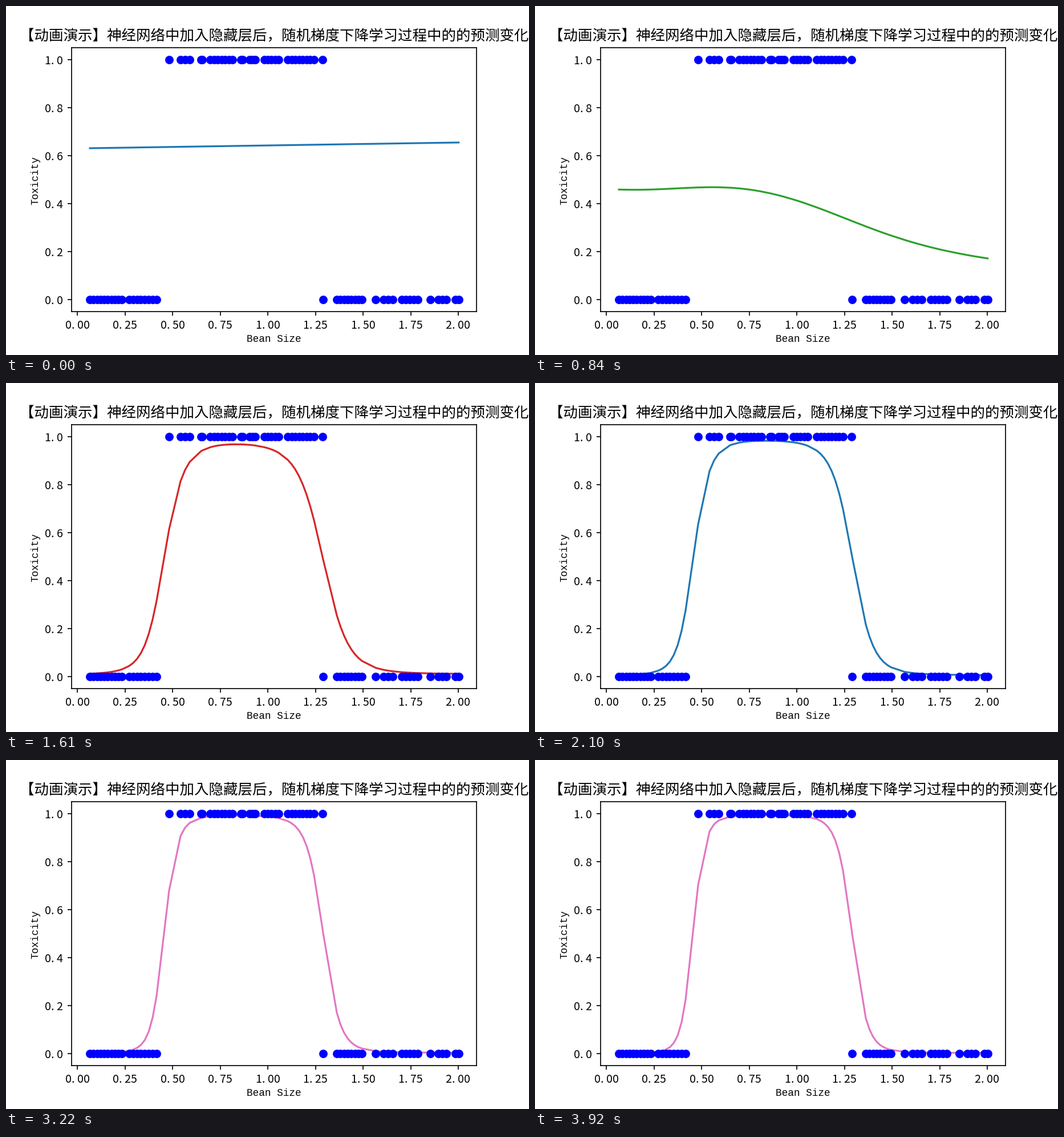
Write a matplotlib script that moves like this. It is 917 by 611 pixels and loops after 3.99 s.

```python
import numpy as np
import matplotlib.pyplot as plt
from matplotlib.animation import FuncAnimation
from matplotlib.ticker import FuncFormatter, MultipleLocator

W, H = 917, 611
DPI = 152.75
FRAMES, INTERVAL = 57, 70
SPACING = 0.0195  # usual distance between neighbouring beans

plt.rcParams["font.family"] = "Noto Sans CJK JP"

# Beans lie evenly within clusters, each given by its smallest and largest size
CLUSTERS = [(0.065, 0.233), (0.271, 0.415), (0.481, 0.481), (0.541, 0.589),
            (0.649, 0.655), (0.697, 0.814), (0.859, 0.868), (0.904, 0.934),
            (0.981, 1.056), (1.104, 1.242), (1.287, 1.290), (1.362, 1.494),
            (1.566, 1.566), (1.608, 1.656), (1.703, 1.787), (1.853, 1.853),
            (1.895, 1.937), (1.985, 2.002)]


def beans(first, last):
    if first == last:
        return [first]
    return np.linspace(first, last, max(2, round((last - first) / SPACING) + 1))


xs = np.concatenate([beans(*c) for c in CLUSTERS])
ys = ((xs > 0.45) & (xs < 1.289)).astype(int)

# Network states: bias, then weight, steepness and centre of both hidden units
BUMP = np.array([-3.51, 6.5, 7.7, 0.431, -6.45, 5.5, 1.305])
STEEP = np.array([-5.52, 10.2, 9.2, 0.438, -9.9, 7.3, 1.305])
FINAL = np.array([-6.8, 12.6, 10.3, 0.438, -11.9, 8.4, 1.296])
BEND, BUMP_AT, STEEP_AT = 10, 16, 30


def sigmoid(z):
    return 1 / (1 + np.exp(-z))


def network(bias, w1, k1, m1, w2, k2, m2):
    return bias + w1 * sigmoid(k1 * (xs - m1)) + w2 * sigmoid(k2 * (xs - m2))


def line(middle, tilt):
    return np.linspace(middle + tilt, middle - tilt, 2) @ [
        (xs[-1] - xs) / (xs[-1] - xs[0]), (xs - xs[0]) / (xs[-1] - xs[0])]


def log_mix(i, start, end, shift, a, b):
    """Blend two states with progress that slows down logarithmically."""
    u = np.log((i + shift) / (start + shift)) / np.log((end + shift) / (start + shift))
    return a + (b - a) * u


def grow(t):
    return 2 * t**2 - t**3


def tilted(i):
    """Early, nearly straight prediction whose tilt grows exponentially."""
    return line(-0.437, 0.055 * 1.31 ** (i - 1))


def prediction(i):
    if i == 0:
        z = line(0.589, -0.052)
    elif i <= BEND:
        z = tilted(i)
    elif i < BUMP_AT:
        # The falling side is learned a little ahead of the rising side
        t = (i - BEND) / (BUMP_AT - BEND)
        fall, rise = grow(t), grow(t**1.2)
        soft_rise, soft_fall = 0.5 + 0.5 * rise, 0.5 + 0.5 * fall
        state = BUMP * [rise, rise, soft_rise, 1, fall, soft_fall, 1]
        z = tilted(BEND) * (1 - fall) + network(*state)
    elif i < STEEP_AT:
        z = network(*log_mix(i, BUMP_AT, STEEP_AT, -10, BUMP, STEEP))
    else:
        z = network(*log_mix(i, STEEP_AT, FRAMES - 1, 10, STEEP, FINAL))
    return sigmoid(z)


def wide_point(digits):
    """Tick format with a wide decimal point."""
    return FuncFormatter(lambda v, _: f"{v:.{digits}f}".replace(".", ". "))


fig = plt.figure(figsize=(W / DPI + 1e-6, H / DPI + 1e-6), dpi=DPI, facecolor="white")
ax = fig.add_axes([0.125, 0.125, 0.775, 0.755])
ax.set_xlim(-0.0324, 2.0968)
ax.set_ylim(-0.05, 1.05)

for axis, step, digits in ((ax.xaxis, 0.25, 2), (ax.yaxis, 0.2, 1)):
    axis.set_major_locator(MultipleLocator(step))
    axis.set_major_formatter(wide_point(digits))
ax.tick_params(labelsize=9.3)

ax.set_title("【动画演示】神经网络中加入隐藏层后，随机梯度下降学习过程中的的预测变化",
             fontsize=12)
label = dict(family="Liberation Mono", fontsize=8.35, ha="center", va="baseline")
fig.text(469.5 / W, 1 - 588 / H, "Bean Size", **label)
fig.text(56.5 / W, 1 - 305.5 / H, "Toxicity", rotation=90,
         rotation_mode="anchor", **label)

ax.scatter(xs, ys, c="blue", s=36, linewidths=1, zorder=3)
curve, = ax.plot(xs, prediction(0), color="C0", lw=1.5, zorder=2)


def update(i):
    curve.set_ydata(prediction(i))
    curve.set_color(f"C{i % 10}")
    return curve,


anim = FuncAnimation(fig, update, frames=FRAMES, interval=INTERVAL,
                     repeat=True, repeat_delay=0, blit=False)
plt.show()
```
